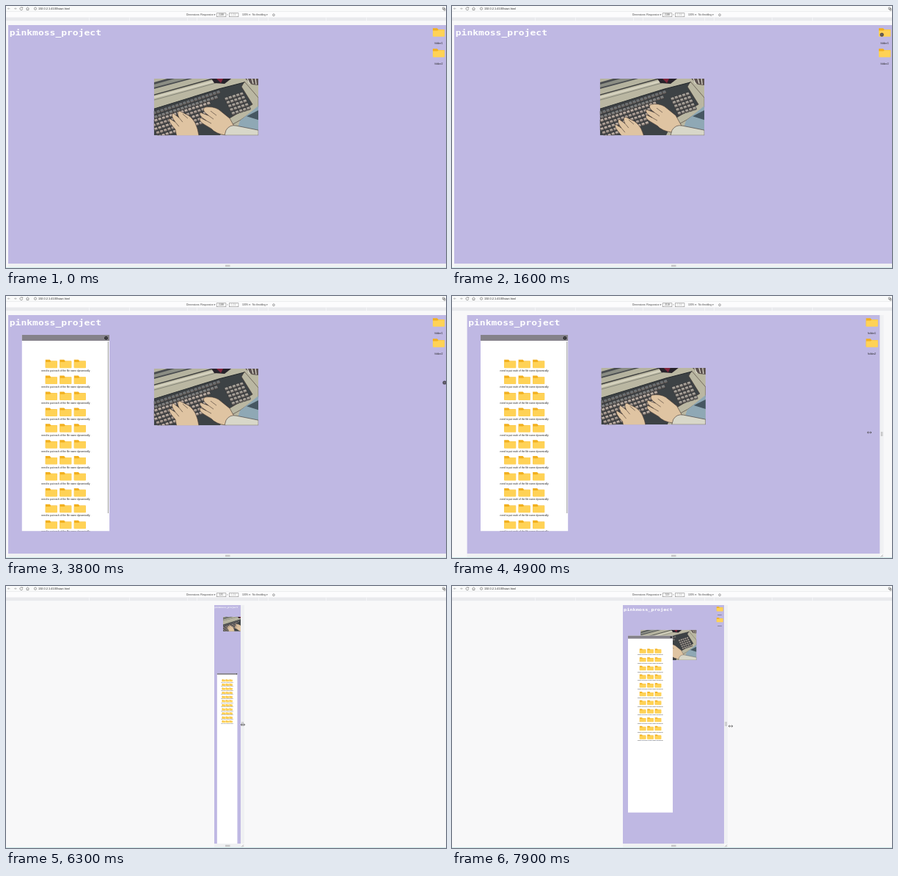
An HTML page for the animation above (8 s loop, 600x357 px).

```html
<!DOCTYPE html>
<html lang="en">
<head>
<meta charset="utf-8">
<title>Responsive desktop page</title>
<style>
  html, body { margin: 0; width: 100%; height: 100%; overflow: hidden; background: #f8f8f9; }
  #stage { display: block; width: 600px; height: 357px; font-family: "Liberation Sans", Arial, sans-serif; }
  .title { font: bold 13px "DejaVu Sans Mono", monospace; }
</style>
</head>
<body>
<svg id="stage" viewBox="0 0 600 357" xmlns="http://www.w3.org/2000/svg"></svg>
<script>
const LOOP = 8000, STEP = 100;
const CENTER = 302, TOP = 26, PAGE_H = 325, FULL = 598, FLUID = 258, TINY = 66;

const rect = (x, y, w, h, fill, more = '') =>
  `<rect x="${x}" y="${y}" width="${w}" height="${h}" fill="${fill}" ${more}/>`;
const text = (x, y, size, str, fill = '#444', more = '') =>
  `<text x="${x}" y="${y}" font-size="${size}" fill="${fill}" ${more}>${str}</text>`;
const path = (d, fill, more = '') => `<path d="${d}" fill="${fill}" ${more}/>`;
const range = (n, fn) => Array.from({ length: n }, (_, i) => fn(i)).join('');
const middle = 'text-anchor="middle"';
const right = 'text-anchor="end"';

const folder = (x, y) => `<g transform="translate(${x} ${y})">` +
  path('M-8-5.8h6l1.5 1.8H7.8V5H-8z', '#f2b01e') +
  path('M-8-2.6h6.4l1.4-1.2H8.2V4.9q0 .8-.8.8H-7.2q-.8 0-.8-.8z', '#ffd256') + '</g>';

function browserBar() {
  const line = 'fill="none" stroke="#666" stroke-width=".6"';
  return rect(0, 0, 600, 7, '#f9fafa') + rect(0, 7, 600, 14, '#fcfcfd') + rect(0, 7, 600, .6, '#e3e4e6') +
    `<path d="M5.5 3.6H2.5l1.2-1.2M2.5 3.6l1.2 1.2M11 3.6h3l-1.2-1.2M14 3.6l-1.2 1.2" ${line} opacity=".6"/>` +
    `<path d="M22.3 2.5a1.9 1.9 0 1 0 .4 1.6M22.7 1.5v1.3h-1.3M27.5 3.6l2-1.8 2 1.8M28.2 3.2v2.3h2.6V3.2" ${line}/>` +
    `<circle cx="40" cy="3.6" r="1.6" ${line}/>` + text(44, 5, 3.9, '192.0.2.1:4100/start.html', '#333') +
    `<path d="M595.3 2h2.4v2.4h-2.4zM597 3.6h2V6h-2z" ${line}/>` +
    text(246, 13.3, 3.35, 'Dimensions: Responsive ▾') +
    rect(287.3, 9.7, 12.6, 5, '#fff', 'stroke="#888" stroke-width=".6"') +
    rect(304.3, 9.7, 12.6, 5, '#fff', 'stroke="#888" stroke-width=".6"') +
    text(293.5, 13.4, 3.3, '', '#444', middle + ' id="pixels"') +
    text(302, 13.3, 3.3, '×', '#777', middle) + text(310.5, 13.4, 3.3, '1224', '#aaa', middle) +
    text(322, 13.3, 3.35, '100% ▾') + text(336, 13.3, 3.35, 'No throttling ▾') +
    `<circle cx="365" cy="12.2" r="1.4" ${line}/>` +
    rect(0, 15.5, 600, 4.8, '#e9eaed') +
    [113, 168, 247, 260, 344, 357, 436, 491].map(x => rect(x, 15.5, .7, 4.8, '#f8f8fa')).join('');
}

function picture() {
  // A key cap with a shaded front face
  const key = (x, y, top) =>
    path(`M${x} ${y}l4-1.3 1.6 2.6v1.6l-4 1.3-1.6-2z`, '#6d6662', 'stroke="#2b2d30" stroke-width=".5"') +
    path(`M${x + .3} ${y + .2}l3.5-1.1 1.2 2.2-3.5 1.1z`, top);
  const keyRow = (x, y, n, top) => range(n, i => key(x + i * 5.1, y - i * 1.65, top));
  const ink = 'stroke="#42352f" stroke-width=".6" stroke-linejoin="round"';
  const stripe = (d, color, width) => path(d, 'none', `stroke="${color}" stroke-width="${width}"`);
  return rect(0, 0, 142, 77, '#bab7a2') +
    path('M0 0H80L0 23z', '#b5b39f') + path('M0 5L18 0H52L0 14z', '#4a4d50') + path('M0 8L28 0H46L0 12z', '#8b8d84') +
    stripe('M0 22L80 0', '#3d3e3e', 1.4) + stripe('M0 25.5L88 2', '#d6d3c0', 2.6) + stripe('M0 29L84 6', '#77786f', .8) +
    path('M78 0H105L96 7 82 6z', '#27222a') + path('M85 0h9l-3 6z', '#81243a') +
    path('M124 0H142V9L133 8z', '#5c5250') + stripe('M127 0l3 7M133 0l2 7M138 0l1 8', '#e2ded0', 1.2) +
    path('M0 41L88 14 123 5 141 28V35L97 62 90 77H0z', '#3d4245') +
    path('M123 4L142 26V39L118 56 98 67 91 61 134 35 119 11z', '#bab7a2', ink) +
    path('M142 37V77H110L117 57z', '#8fa8b5') + path('M126 51l16-8v13z', '#465762') +
    stripe('M0 41L88 14 123 5', '#25292c', 1) +
    keyRow(-2, 45, 18, '#6b7174') + keyRow(0, 50.5, 17, '#7d8081') +
    range(5, r => keyRow(-5 + r * 2.5, 57 + r * 5, 16 - r, r % 2 ? '#aea198' : '#bcaea4')) +
    range(5, r => keyRow(96 + r * 2.3, 26 + r * 4.9, 5, '#a9a49c')) +
    `<g id="leftHand">${path('M34 94L29 69Q18 57 21 54L29 59Q22 50 26 47L34 53Q30 45 35 44L47 50Q58 57 61 77V94z', '#dfc4a2', ink)}
      ${path('M29 59l5 6M34 53l5 6M39 48l7 6', 'none', ink)}</g>` +
    `<g id="rightHand">${path('M98 77Q84 75 78 68L68 62Q60 57 63 53L71 57Q60 50 63 46L74 50Q64 43 69 39 80 37 88 42L103 54 112 70z', '#dfc4a2', ink)}
      ${path('M71 57l7 4M74 50l7 5M77 44l8 6', 'none', ink)}</g>` +
    path('M96 77L98 70Q103 62 112 64L142 70V77z', '#d8d7c9', ink);
}

function tooltip() {
  const row = (y, name, value = '') => text(8, y, 3.2, name, '#666') + text(50.5, y, 3.2, value, '#333', right);
  return path('M8 206l2.5-3 2.5 3z', '#fff') +
    rect(6, 206, 47, 51, '#fff', 'rx="1" stroke="#b5b3c3" stroke-width=".4"') +
    text(8, 211, 3.3, 'div.text', '#7b1f86', 'font-weight="bold"') + text(50.5, 211, 3.2, '2021.99 × 500', '#888', right) +
    row(216.7, 'Color', '#000000') + rect(34.2, 213.8, 2.8, 2.8, '#000') +
    row(221.7, 'Font', '16px "Sample Gothic"') + row(226.7, 'Margin', '67.375px 0px 0px') +
    rect(8, 229, 43, .3, '#ccc') + text(8, 233.7, 2.4, 'ACCESSIBILITY', '#777') +
    row(239.8, 'Contrast') + text(34, 239.8, 3.2, 'Aa&#160; 21', '#333') +
    '<circle cx="48.7" cy="238.6" r="1.6" fill="#777"/>' +
    row(244.7, 'Name') + row(249.6, 'Role', 'generic') + row(254.5, 'Keyboard-focusable') +
    '<circle cx="48.7" cy="253.3" r="1.5" fill="none" stroke="#777" stroke-width=".5"/>';
}

const blue = 'rgba(111,168,220,.66)', orange = 'rgba(246,178,107,.66)';
const shortcuts = [0, 1].map(i => folder(0, 10 + i * 28) +
  text(0, 26.2 + i * 28, 3.6, 'folder' + (i + 1), '#222', middle)).join('');
const fileRows = range(11, i => {
  const y = 39.5 + i * 21.9;
  return [-19.5, 0, 19.5].map(x => folder(x, y)).join('') +
    text(0, y + 10.7, 3.3, 'need to put each of the file name dynamically', '#222', middle);
});

document.getElementById('stage').innerHTML =
  rect(0, 0, 600, 357, '#f8f8f9') + browserBar() +
  `<g id="handles">
    ${rect(0, 351, 1, 5, '#f0f1f3', 'id="bottomBar"')}${rect(0, TOP, 5, PAGE_H, '#f0f1f3', 'id="sideBar"')}
    <path id="sideGrip" d="M1.8 185v6M3.3 185v6" stroke="#999" stroke-width=".6"/>
    <path id="cornerGrip" d="M1 355.5l3-3M2.8 355.5l1.4-1.4" stroke="#888" stroke-width=".6"/>
  </g>` +
  path('M299 353.3h6.5M299 354.7h6.5', 'none', 'stroke="#999" stroke-width=".6"') +
  rect(0, 356, 600, 1, '#cfe9ea') +
  `<svg id="page" y="${TOP}" height="${PAGE_H}" overflow="hidden">
    ${rect(0, 0, '100%', '100%', '#bfb8e3')}
    <g id="heading"><g transform="translate(1.8 14.3) scale(1 .75)">${text(0, 0, 13, 'pinkmoss_project', '#fff', 'class="title"')}</g></g>
    <g id="shortcuts">${shortcuts}</g>
    <svg id="picture" viewBox="0 0 142 77" overflow="hidden">${picture()}</svg>
    <svg id="win" overflow="hidden">
      ${rect(0, 0, '100%', '100%', '#fff')}
      <g id="files">${fileRows}</g>
      ${rect(0, 0, '100%', 8, '#85828a', 'id="winBar"')}
      <g id="close"><circle r="2.3" fill="#1d1d20"/><path d="M-.8-.8l1.6 1.6M.8-.8l-1.6 1.6" stroke="#bbb" stroke-width=".5"/></g>
      ${rect(117.3, 9, 1.2, 234, '#a5a5a8', 'id="scrollbar"')}
    </svg>
  </svg>` +
  `<g id="bodyMark">${rect(3, TOP, 597, PAGE_H, blue)}</g>
  <g id="headMark">${rect(3, TOP, 597, 28, blue)}</g>
  <g id="boxMark">${path('M6 54H599V203H539.5V72H6z', orange)}${rect(6, 72, 533.5, 131, blue)}${tooltip()}</g>` +
  `<g id="cursor">
    <path id="arrow" d="M-1-2.5V2.3L.2 1.2 1 3l.8-.4L1.1.9h1.6z" fill="#fff" stroke="#222" stroke-width=".6"/>
    <g id="touch"><circle r="2.6" fill="#3d3b44" fill-opacity=".85"/><circle r=".9" fill="#8d8996" fill-opacity=".7"/></g>
    <path id="resize" d="M-2.8 0h5.6M-1.4-1.3L-2.8 0l1.4 1.3M1.4-1.3L2.8 0 1.4 1.3" fill="none" stroke="#444" stroke-width=".7"/>
  </g>`;

const el = {};
document.querySelectorAll('#stage [id]').forEach(node => el[node.id] = node);
const set = (node, attrs) => { for (const k in attrs) node.setAttribute(k, attrs[k]); };
const show = (node, on) => node.setAttribute('visibility', on ? 'visible' : 'hidden');
const place = (node, x, y, s = 1) => node.setAttribute('transform', `translate(${x} ${y}) scale(${s})`);

// Linear interpolation over [time, ...values] stops
function track(stops, t) {
  const i = stops.findIndex(s => s[0] > t);
  if (i < 0) return stops[stops.length - 1].slice(1);
  if (i === 0) return stops[0].slice(1);
  const a = stops[i - 1], b = stops[i], k = (t - a[0]) / (b[0] - a[0]);
  return a.slice(1).map((v, j) => v + (b[j + 1] - v) * k);
}

const widths = [[4600, FULL], [5100, 540], [5400, 405], [5500, 180], [5800, 110], [6100, 52], [6300, 36],
  [6600, 38], [7200, 62], [7900, 138]];
const pointer = [[400, 570, 240], [700, 555, 106], [1000, 572, 78], [1300, 586, 39], [3200, 587, 39.5],
  [3500, 594, 52], [3700, 597, 77], [3800, 598, 118], [4500, 598, 179], [4600, 598, 186], [5100, 550, 186],
  [5400, 470, 186], [5500, 363, 186], [6300, 323, 189], [7200, 341, 189], [7900, 380, 191]];

function layout(w) {
  const left = CENTER - w / 2, edge = CENTER + w / 2;
  const tiny = w < TINY, s = Math.max(TINY / FLUID, Math.min(1, w / FLUID));
  set(el.page, { x: left, width: w });
  el.pixels.textContent = Math.round(w * 3.76);
  place(el.heading, 0, 0, s);
  place(el.shortcuts, w - 11 * s, 0, s);
  show(el.shortcuts, !tiny);

  const wide = Math.max(0, Math.min(1, (w - FLUID) / (FULL - FLUID)));
  set(el.picture, { x: tiny ? w / 3 : .4515 * w - 71.2 * s, y: 63 * s + 10 * wide, width: 142.4 * s, height: 77.2 * s });

  const winW = tiny ? .78 * w : Math.min(119.5, .444 * w);
  set(el.win, {
    x: tiny ? .1 * w : Math.min(18.5, .05 * w), y: tiny ? 92.7 : 27 + 31 * (1 - s),
    width: winW, height: tiny ? 250 : 267.5 - 56 * (1 - s)
  });
  place(el.files, winW / 2, 0, s);
  place(el.close, winW - 4.5 * s, 4.2 * s, s);
  set(el.winBar, { height: 8 * s });

  set(el.bottomBar, { x: left, width: w });
  set(el.sideBar, { x: edge });
  place(el.sideGrip, edge, 0);
  place(el.cornerGrip, edge, 0);
  return s;
}

function draw(time) {
  const n = Math.floor((time % LOOP) / STEP), t = n * STEP;
  const s = layout(track(widths, t)[0]);
  const tap = n % 5;
  place(el.leftHand, 0, [0, 8, 0, 0, 4][tap]);
  place(el.rightHand, 0, [0, -4, 0, 0, -2][tap]);

  const open = t >= 3200;
  show(el.win, open);
  show(el.scrollbar, open && s === 1);
  show(el.bodyMark, t >= 500 && t < 600);
  show(el.boxMark, t >= 600 && t < 1200);
  show(el.headMark, t >= 1200 && t < 1300);

  place(el.cursor, ...track(pointer, t));
  show(el.arrow, t >= 400 && t < 1300);
  show(el.touch, t >= 1300 && t < 4600);
  show(el.resize, t >= 4600);
}

const start = performance.now();
function frame() {
  draw(performance.now() - start);
  requestAnimationFrame(frame);
}
draw(0);
requestAnimationFrame(frame);
</script>
</body>
</html>
```
